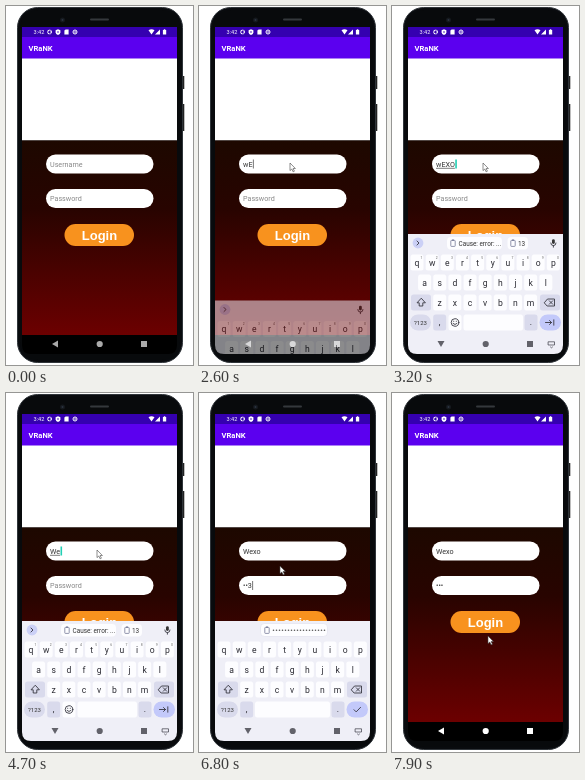
An HTML page for the animation above (8 s loop, 187x359 px).

```html
<!DOCTYPE html>
<html lang="en">
<head>
<meta charset="utf-8">
<title>Login screen</title>
<style>
html, body { margin: 0; width: 100%; height: 100%; overflow: hidden; background: #fff; }
svg { display: block; width: 100vw; height: 100vh; font-family: Roboto, sans-serif; }
.mid { text-anchor: middle; }
.input { font-size: 7.2px; fill: #333; }
.hint { fill: #888; }
.letter { font-size: 8.6px; fill: #2b2b33; text-anchor: middle; }
.alt { font-size: 3.4px; fill: #666; }
.key { fill: #fdfdff; }
.soft { fill: #d9daec; }
.line { fill: none; stroke: #383842; stroke-width: .9; stroke-linejoin: round; stroke-linecap: round; }
.login { font: 700 13px 'Liberation Sans', sans-serif; fill: #fff; }
</style>
</head>
<body>
<svg viewBox="0 0 187 359">
  <defs>
    <linearGradient id="wall" x1="0" y1="0" x2="0" y2="1">
      <stop offset="0" stop-color="#1d0800"/>
      <stop offset=".35" stop-color="#280400"/>
      <stop offset="1" stop-color="#6c0000"/>
    </linearGradient>
    <clipPath id="screen"><path d="M16 21H171V339Q171 348 162 348H25Q16 348 16 339Z"/></clipPath>
    <g id="clip"><rect x="-2.2" y="-2.8" width="4.4" height="6" rx=".6" fill="none" stroke="#777b99" stroke-width=".8"/><path d="M-1-3H1" stroke="#777b99" stroke-width="1.2"/></g>
  </defs>

  <!-- phone body -->
  <path d="M176 70h2.3v13h-2.3zM176 98h2.3v27h-2.3z" fill="#222"/>
  <rect x="11.5" y="1.5" width="165" height="355" rx="20" fill="#090b0e" stroke="#30353a"/>
  <rect x="14" y="4" width="160" height="350" rx="18" fill="#080a0c"/>
  <circle cx="56.5" cy="14" r="2.5" fill="#15191e"/><circle cx="56.5" cy="14" r="1" fill="#2a3340"/>
  <rect x="84" y="12.5" width="19" height="2" rx="1" fill="#34383c"/>

  <g clip-path="url(#screen)">
    <rect x="16" y="21" width="155" height="11" fill="#3500b0"/>
    <rect x="16" y="31" width="155" height="22" fill="#5b00ef"/>
    <rect x="16" y="52.5" width="155" height="82" fill="#fff"/>
    <rect x="16" y="134.5" width="155" height="195" fill="url(#wall)"/>
    <rect x="16" y="329" width="155" height="20" fill="#000"/>

    <!-- status bar -->
    <g fill="#fff">
      <text x="27.5" y="28.2" font-size="5.6">3:42</text>
      <circle cx="43.5" cy="26" r="1.8" fill="none" stroke="#fff" stroke-width="1.3" stroke-dasharray="1.1 .4"/>
      <path d="M52 23.2l2.4 1v2q0 1.8-2.4 2.9q-2.4-1.1-2.4-2.9v-2z"/>
      <circle cx="52" cy="26" r=".8" fill="#3500b0"/>
      <path d="M59.6 23.4h3v5.2h-4.2v-4z"/>
      <circle cx="69" cy="26" r="2" fill="none" stroke="#fff"/><path d="M68.6 25h.9v2h-.9z"/>
      <path d="M142.5 24.3q3-2 6 0l-3 4.2zM154 23.5v5h-5zM156.9 24h.9v-.8h1.5v.8h.9v4.6h-3.3z"/>
    </g>
    <text x="22.5" y="45.2" font-size="7.6" font-weight="700" fill="#fff">VRaNK</text>

    <!-- form -->
    <rect x="40" y="148.5" width="107.5" height="19" rx="9.5" fill="#fff"/>
    <rect x="40" y="183" width="107.5" height="19" rx="9.5" fill="#fff"/>
    <text id="user" class="input" x="44" y="160.6"></text>
    <text id="pass" class="input" x="44" y="195.2"></text>
    <path id="underline" stroke="#444" stroke-width=".7"/>
    <rect id="caret" height="9"/>
    <rect x="58.5" y="218" width="69.5" height="22" rx="11" fill="#f8921e"/>
    <text class="mid login" x="93.5" y="233.8">Login</text>

    <g id="nav"><path d="M52 334.5v7l-6-3.5z"/><circle cx="93.7" cy="338" r="3.1"/><path d="M135 335h6v6h-6z"/></g>

    <g id="keyboard">
      <rect x="16" y="228" width="155" height="190" fill="#efeff7"/>
      <g id="keys"></g>
      <g id="toolbar">
        <circle cx="26" cy="237" r="5.4" fill="#cbd0f6"/>
        <path class="line" d="M25 235l2 2l-2 2"/>
        <rect x="160" y="233.2" width="2.8" height="4.8" rx="1.4" fill="#333"/>
        <path class="line" d="M158.8 237q0 2.6 2.6 2.6t2.6-2.6M161.4 239.6v1.6"/>
        <g id="clips">
          <rect x="55" y="231" width="55" height="12.5" rx="4" fill="#fdfdff"/>
          <use href="#clip" x="61" y="237.2"/>
          <text x="66.5" y="239.5" font-size="6.4" fill="#333">Cause: error: ...</text>
          <rect x="115.5" y="231" width="20.5" height="12.5" rx="4" fill="#fdfdff"/>
          <use href="#clip" x="121" y="237.2"/>
          <text x="126" y="239.5" font-size="6.4" fill="#333">13</text>
        </g>
      </g>
      <g id="secret">
        <rect x="61.5" y="230.5" width="67" height="13" rx="4" fill="#fdfdff" stroke="#dfe0ec" stroke-width=".6"/>
        <use href="#clip" x="68" y="237.2"/>
        <path d="M74.5 237.2H126" stroke="#555" stroke-width="1.6" stroke-linecap="round" stroke-dasharray="0 3"/>
      </g>
      <g id="digits"></g>
    </g>
    <g id="navDown" fill="#62626a">
      <path d="M45.5 335h7l-3.5 6z"/><circle cx="93.7" cy="338" r="3.1"/><path d="M135 335h6v6h-6z"/>
      <path class="line" d="M156.5 335.8h6v3.2h-6zM158.5 341l1 .8l1-.8" style="stroke-width:.7"/>
    </g>
  </g>

  <path id="cursor" d="M0 0V7.6L1.8 6L3.1 8.8L4.4 8.2L3.1 5.5H5.4Z" fill="#fff" stroke="#444" stroke-width=".6"/>
</svg>
<script>
const LOOP = 8000, STEP = 100, PITCH = 15.15;
const $ = id => document.getElementById(id);
const show = (id, on) => $(id).style.display = on ? '' : 'none';
const set = (id, attrs) => Object.entries(attrs).forEach(([k, v]) => $(id).setAttribute(k, v));

const letter = (x, y, text) => `<text class="letter" x="${x}" y="${y}">${text}</text>`;
const key = (x, y, w, type = 'key', r = 2.5) =>
  `<rect class="${type}" x="${x - w / 2}" y="${y - 8}" width="${w}" height="16" rx="${r}"/>`;
const spread = (text, x, make) => [...text].map((c, i) => make(x + i * PITCH, c)).join('');
const row = (text, x, y) => spread(text, x, (kx, c) => key(kx, y, 13) + letter(kx, y + 3, c));

$('keys').innerHTML =
  row('qwertyuiop', 25, 256.5) + row('asdfghjkl', 32.6, 276.5) + row('zxcvbnm', 47.7, 296.5) +
  `<g id="alts">${spread('1234567890', 28.6, (x, c) => `<text class="alt" x="${x}" y="252.5">${c}</text>`)}</g>` +
  key(29, 296.5, 20, 'soft') + key(158, 296.5, 20, 'soft') +
  '<path class="line" d="M29 292.5l-4 4.3h2.2v3.2h3.6v-3.2h2.2zM152.5 296.5l3-3.5h7v7h-7zM157.3 294.8l3.4 3.4m0-3.4l-3.4 3.4"/>' +
  key(28.5, 316.5, 21, 'soft', 8) + '<text class="mid" x="28.5" y="318.8" font-size="6" fill="#333">?123</text>' +
  key(47.7, 316.5, 13, 'soft') + letter(47.7, 318.5, ',') +
  '<rect id="space" class="key" y="308.5" height="16" rx="2.5"/>' +
  '<g id="smile">' + key(63, 316.5, 13) + '<circle class="line" cx="63" cy="316.5" r="3.8"/><path class="line" d="M61 317.5q2 2.2 4 0M61.7 315.2v.2M64.3 315.2v.2"/></g>' +
  key(139, 316.5, 13, 'soft') + letter(139, 318.5, '.') +
  '<rect x="147.5" y="308.5" width="21.5" height="16" rx="8" fill="#c3c9fa"/><path id="enter" class="line"/>';
$('digits').innerHTML = spread('1234567890', 25, (x, c) => letter(x, 240, c));

// Each text holds until the next entry
const names = [[0, ''], [2300, 'w'], [2600, 'wE'], [2800, 'wEX'], [3100, 'wEXO'],
  [3500, 'wEX'], [3700, 'wE'], [3900, 'w'], [4000, ''], [4500, 'W'], [4700, 'We'], [4900, 'Wex'], [5000, 'Wexo']];
const codes = [[0, ''], [6200, '1'], [6400, '•2'], [6500, '••3'], [7800, '•••']];
// [time, x, y]
const cursorRoute = [[100, 132, 2], [400, 112, 90], [700, 91, 157], [5100, 91, 157], [5500, 84, 190],
  [5600, 84, 190], [5900, 81, 173], [6800, 81, 173], [7300, 49, 335], [7500, 49, 335],
  [7700, 57, 324], [7900, 96, 243]];
// [time, offset, opacity]
const slide = [[2500, 100, 0], [2600, 66.5, .55], [2700, 28, .85], [2800, 6, 1], [2900, 0, 1],
  [7600, 0, 1], [7700, 6, .82], [7800, 50, .35], [7900, 100, 0]];

const hold = (list, t) => list.filter(e => e[0] <= t).pop()[1];
function tween(list, t) {
  const i = list.findIndex(e => e[0] >= t);
  if (i < 0) return list[list.length - 1].slice(1);
  if (i === 0) return list[0].slice(1);
  const a = list[i - 1], b = list[i], k = (t - a[0]) / (b[0] - a[0]);
  return a.slice(1).map((v, n) => v + (b[n + 1] - v) * k);
}

function setField(id, value, hint) {
  $(id).textContent = value || hint;
  $(id).classList.toggle('hint', !value);
  return value ? $(id).getComputedTextLength() : 0;
}

function draw(t) {
  const secure = t >= 5600;
  const name = hold(names, t);
  const nameWidth = setField('user', name, 'Username');
  const codeWidth = setField('pass', hold(codes, t), 'Password');

  const composing = t >= 2800 && !secure && name;
  show('underline', composing);
  set('underline', { d: `M44 162.3h${nameWidth}` });
  const caretOn = t < 2100 ? t % 1000 < 500 : t < 7800;
  show('caret', t >= 1000 && caretOn);
  set('caret', {
    x: 44.4 + (secure ? codeWidth : nameWidth),
    y: secure ? 188 : 153.5,
    width: composing ? 1.6 : .8,
    fill: composing ? '#22cfb4' : '#555'
  });

  const [dy, opacity] = tween(slide, t);
  show('keyboard', t >= 2600 && t < 7900);
  set('keyboard', { transform: `translate(0 ${dy})`, opacity });
  show('toolbar', !secure);
  show('clips', t >= 2900);
  show('alts', !secure);
  show('smile', !secure);
  show('secret', t >= 6000 && t < 7500);
  show('digits', t >= 7500);
  set('space', secure ? { x: 56, width: 75 } : { x: 71.5, width: 59.5 });
  set('enter', { d: secure ? 'M155 316.7l2.2 2.2l4.4-4.6' : 'M153.5 316.5h6m-2-2l2 2l-2 2M161.8 313.8v5.4' });

  const covered = t >= 2700 && t < 7800;
  show('navDown', covered);
  show('nav', !covered);
  set('nav', { fill: t >= 7800 ? '#fff' : '#aaa' });

  show('cursor', t >= 100);
  set('cursor', { transform: `translate(${tween(cursorRoute, t).join(' ')})` });
}

const start = performance.now();
let last = -1;
function tick() {
  const elapsed = (performance.now() - start) % LOOP;
  const t = elapsed - elapsed % STEP;
  if (t !== last) draw(last = t);
  requestAnimationFrame(tick);
}
tick();
</script>
</body>
</html>
```
